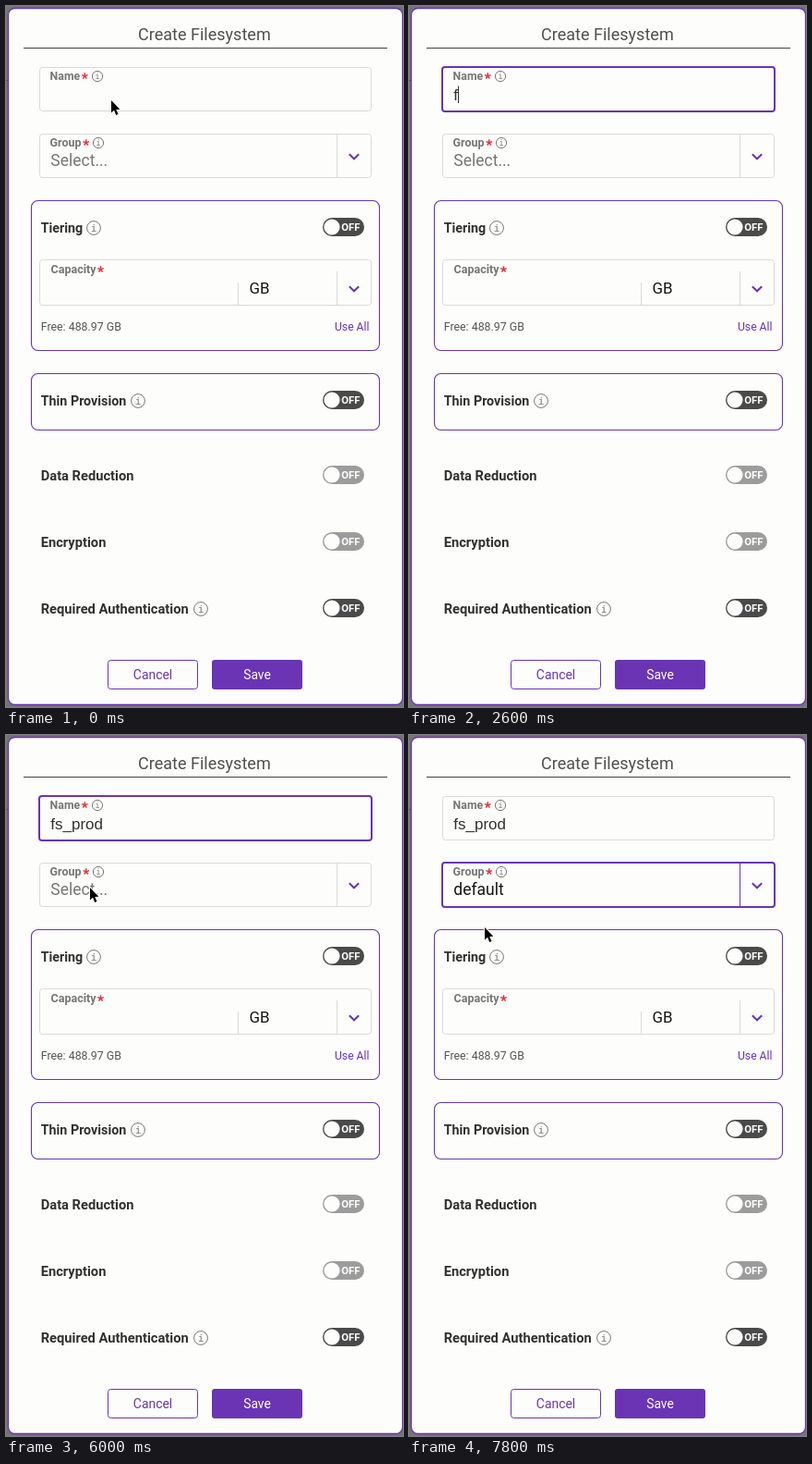
Recreate the animation shown at these times as an HTML page with a canvas. Size 430x758 px, loop 8 s.

```html
<!DOCTYPE html>
<html lang="en">
<head>
<meta charset="utf-8">
<title>Create Filesystem</title>
<style>
html, body { margin: 0; width: 100%; height: 100%; overflow: hidden; background: #747474; }
canvas { display: block; width: 430px; height: 758px; }
</style>
</head>
<body>
<canvas id="stage"></canvas>
<script>
const W = 430, H = 758, LOOP = 8000, STEP = 200;
const PURPLE = '#6a34b4', PAPER = '#fdfdfc', LINE = '#dadada', RED = '#e5333a';
const DARK = '#303030', GREY = '#767676', BLACK = '#161616';
const SANS = 'Roboto, "Noto Sans", sans-serif';
const INPUT = '"Liberation Sans", Arial, sans-serif';

const canvas = document.getElementById('stage');
const ctx = canvas.getContext('2d');
const dpr = window.devicePixelRatio || 1;
canvas.width = W * dpr;
canvas.height = H * dpr;

// Name field: [time, text]
const typing = [[0, ''], [2600, 'f'], [3000, 'fs'], [3400, 'fs_'], [3600, 'fs_p'],
  [3800, 'fs_pr'], [4000, 'fs_pro'], [4400, 'fs_prod']];
// Text caret: [time, visible]
const blink = [[0, false], [1000, true], [1600, false], [2000, true],
  [4800, false], [5400, true], [5800, false]];
// Pointer: [time, shape, x, y]
const pointer = [[0, 'arrow', 114, 102], [200, 'beam', 112, 101], [600, 'beam', 110.5, 100],
  [2600, 'none', 0, 0], [5400, 'beam', 109, 102], [5600, 'beam', 105, 109],
  [5800, 'arrow', 96, 141], [6000, 'arrow', 91, 165], [6600, 'arrow', 88, 181],
  [6800, 'arrow', 82, 200], [7000, 'arrow', 80, 205], [7600, 'arrow', 81, 207],
  [7800, 'arrow', 82, 208]];
const NAME_FOCUS = 1000, GROUP_FOCUS = 6200, MENU_OPEN = 6400, MENU_CLOSE = 7400;

const at = (keys, t) => keys.filter(k => k[0] <= t).pop();

function text(str, x, y, size, color, weight = 400, family = SANS, align = 'left') {
  ctx.font = `${weight} ${size}px ${family}`;
  ctx.textAlign = align;
  ctx.fillStyle = color;
  ctx.fillText(str, x, y);
}

function box(x, y, w, h, r, stroke, width = 1, fill) {
  ctx.beginPath();
  ctx.roundRect(x, y, w, h, r);
  if (fill) { ctx.fillStyle = fill; ctx.fill(); }
  if (stroke) { ctx.strokeStyle = stroke; ctx.lineWidth = width; ctx.stroke(); }
}

function path(points, stroke, width = 1) {
  ctx.beginPath();
  points.forEach(([x, y]) => ctx.lineTo(x, y));
  ctx.strokeStyle = stroke;
  ctx.lineWidth = width;
  ctx.stroke();
}

function field(y, h, focused) {
  if (focused) box(36, y - 0.5, 360, h + 1, 3, PURPLE, 2);
  else box(36.5, y, 359, h, 3, LINE);
}

function star(x, y) {
  for (let i = 0; i < 5; i++) {
    const a = -Math.PI / 2 + i * Math.PI * 0.4;
    path([[x, y], [x + 3.5 * Math.cos(a), y + 3.5 * Math.sin(a)]], RED, 1.5);
  }
}

function info(x, y, r) {
  ctx.beginPath();
  ctx.arc(x, y, r, 0, Math.PI * 2);
  ctx.strokeStyle = GREY;
  ctx.lineWidth = 1;
  ctx.stroke();
  text('i', x, y + r * 0.56, r * 1.5, GREY, 400, '"DejaVu Sans Mono", monospace', 'center');
}

function chevron(y, up) {
  const d = up ? -2.5 : 2.5;
  path([[371.8, y - d], [377, y + d], [382.2, y - d]], PURPLE, 2);
}

function toggle(y, color) {
  box(343, y - 10, 45, 20, 10, null, 0, color);
  ctx.beginPath();
  ctx.arc(353, y, 8.6, 0, Math.PI * 2);
  ctx.fillStyle = PAPER;
  ctx.fill();
  text('OFF', 373.3, y + 4, 11.3, '#fff', 700, SANS, 'center');
}

function option(str, y, size, active) {
  if (active) { ctx.fillStyle = '#f0f0f0'; ctx.fillRect(36, y - 24, 360, 36); }
  text(str, 47.7, y, size, BLACK);
}

function drawDialog() {
  ctx.fillStyle = '#747474';
  ctx.fillRect(0, 0, W, H);
  ctx.fillStyle = '#555';
  ctx.fillRect(0, 80, 2, 1);
  box(2.5, 2.5, 427, 753, 7, PURPLE, 1.3, PAPER);
  text('Create Filesystem', 143, 37, 18.05, '#505050');
  path([[19, 45.5], [413, 45.5]], '#444');
}

function drawName(t) {
  const value = at(typing, t)[1];
  field(66.5, 47, t >= NAME_FOCUS && t < GROUP_FOCUS);
  text('Name', 47.6, 80, 12.3, GREY, 700);
  star(85.3, 75.7);
  info(99, 76, 5.6);
  text(value, 48.3, 101.5, 17, DARK, 400, INPUT);
  if (at(blink, t)[1]) {
    const x = Math.round(48.5 + ctx.measureText(value).width) + 0.5;
    path([[x, 86.5], [x, 105]], DARK);
  }
}

function drawGroup(t) {
  const focused = t >= GROUP_FOCUS;
  const open = t >= MENU_OPEN && t < MENU_CLOSE;
  field(138.5, 47, focused);
  path([[358.5, 139], [358.5, 185]], focused ? PURPLE : LINE);
  chevron(open ? 161.8 : 162.8, open);
  text('Group', 47.6, 152, 12.5, GREY, 700);
  star(86.8, 147.7);
  info(100, 148, 5.6);
  if (t >= MENU_CLOSE) text('default', 48.3, 173, 17.5, BLACK);
  else text('Select...', 48.3, 173.3, 17.5, GREY);
  if (open) {
    box(35, 187.5, 362, 81, 4, PURPLE, 2, PAPER);
    option('default', 216, 16.8, true);
    option('.meta', 252, 16.3, false);
  }
}

function drawSections() {
  box(27.5, 210.5, 377, 162, 7, PURPLE, 1.1);
  text('Tiering', 37.7, 245, 14.3, DARK, 700);
  info(95, 240, 7.4);
  toggle(239, '#4a4a4a');

  field(274.5, 49, false);
  path([[251.5, 299], [251.5, 323]], LINE);
  path([[358.5, 287], [358.5, 323]], LINE);
  text('Capacity', 48.6, 289, 12.5, GREY, 700);
  star(102.5, 284.7);
  text('GB', 263.6, 311, 16.9, BLACK);
  chevron(305.8, false);
  text('Free: 488.97 GB', 37.7, 351, 12.4, '#555');
  text('Use All', 393.5, 351, 12.2, PURPLE, 400, SANS, 'right');

  box(27.5, 397.5, 377, 61, 7, PURPLE, 1.1);
  text('Thin Provision', 37.7, 432, 14.3, DARK, 700);
  info(143, 427, 7.4);
  toggle(426, '#4a4a4a');

  text('Data Reduction', 37.7, 513, 14.7, DARK, 700);
  toggle(507, '#9c9c9c');
  text('Encryption', 37.7, 585, 14.7, DARK, 700);
  toggle(579, '#9c9c9c');
  text('Required Authentication', 37.7, 657, 14.7, DARK, 700);
  info(211, 652, 7.4);
  toggle(651, '#4a4a4a');

  box(110.5, 707.5, 97, 31, 3, PURPLE);
  text('Cancel', 159, 728, 13.9, PURPLE, 400, SANS, 'center');
  box(223, 707, 98, 32, 3, null, 0, PURPLE);
  text('Save', 272, 728, 13.9, '#fff', 400, SANS, 'center');
}

function drawArrow() {
  ctx.beginPath();
  [[0, 0], [0, 13.6], [3.1, 10.8], [5.2, 16], [7.5, 15], [5.3, 10], [9.4, 9.7]]
    .forEach(([x, y]) => ctx.lineTo(x, y));
  ctx.closePath();
  ctx.strokeStyle = '#fff';
  ctx.lineWidth = 2;
  ctx.stroke();
  ctx.fillStyle = '#000';
  ctx.fill();
}

function drawBeam() {
  for (const [color, width] of [['#fff', 3], [BLACK, 1.3]]) {
    path([[0, -6], [0, 6]], color, width);
    for (const s of [-1, 1])
      path([[-3.2, 7.3 * s], [-1.2, 7 * s], [0, 5.8 * s], [1.2, 7 * s], [3.2, 7.3 * s]], color, width);
    path([[-1.8, 2.5], [1.8, 2.5]], color, width);
  }
}

function drawPointer(t) {
  const [, shape, x, y] = at(pointer, t);
  if (shape === 'none') return;
  ctx.save();
  ctx.translate(x, y);
  if (shape === 'arrow') drawArrow();
  else drawBeam();
  ctx.restore();
}

function frame(now) {
  const t = Math.floor((now % LOOP) / STEP) * STEP;
  ctx.setTransform(dpr, 0, 0, dpr, 0, 0);
  drawDialog();
  drawSections();
  drawName(t);
  drawGroup(t);
  drawPointer(t);
}

const start = performance.now();
function tick() {
  frame(performance.now() - start);
  requestAnimationFrame(tick);
}
tick();
</script>
</body>
</html>
```
